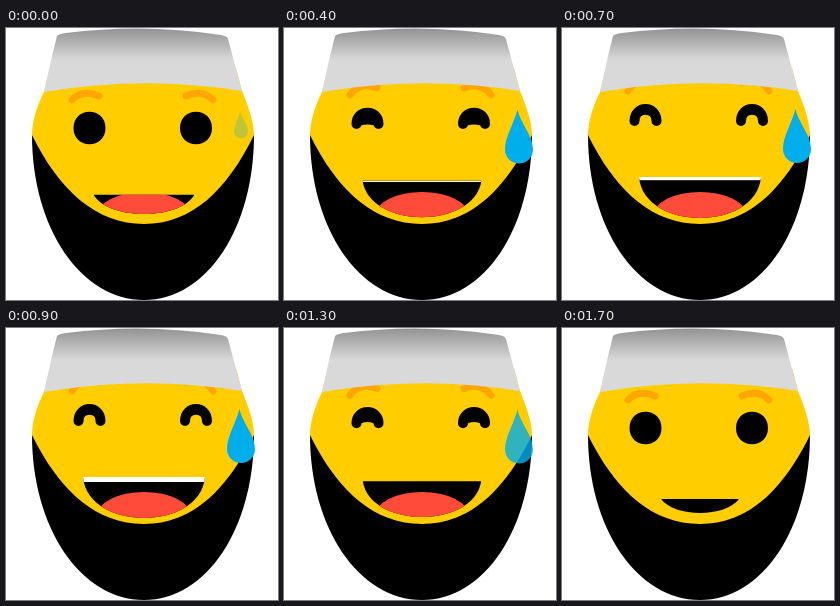
Recreate the animation shown at these times as an HTML page. Size 272 by 272 pixels, loop 2.5 s.

```html
<!DOCTYPE html>
<html lang="en">
<head>
<meta charset="utf-8">
<title>Laughing face</title>
<style>
html, body { margin: 0; height: 100%; overflow: hidden; background: #fff; }
svg { display: block; width: 100%; height: 100%; }
</style>
</head>
<body>
<svg viewBox="0 0 272 272">
  <defs>
    <linearGradient id="felt" x1="0" y1="0" x2="0" y2="1">
      <stop offset="0" stop-color="#939393"/>
      <stop offset=".5" stop-color="#d9d9d9"/>
    </linearGradient>
    <clipPath id="lips"><path id="lipShape"/></clipPath>
  </defs>
  <path fill="#ffcd00" d="M44 40L38 64C30 80 26 95 26 107C53 162 90 197 138 197S221 162 248 107C248 95 243 80 236 63L230 40Z"/>
  <path d="M26 107C26 200 75 272 138 272S248 200 248 107C221 162 186 196 138 196S53 162 26 107Z"/>
  <g fill="none" stroke="#ffa700" stroke-width="7" stroke-linecap="round">
    <path class="brow" transform="translate(83)"/>
    <path class="brow" transform="translate(190) scale(-1 1)"/>
  </g>
  <path fill="url(#felt)" d="M51 8Q53 6 60 5Q138 -5 215 7Q221 8 222 11L236 63Q138 47 38 64L46 28Z"/>
  <g stroke="#000" stroke-width="10" stroke-linejoin="round">
    <path class="eye" transform="translate(83.5)"/>
    <path class="eye" transform="translate(190)"/>
  </g>
  <g clip-path="url(#lips)">
    <rect x="60" y="140" width="160" height="60"/>
    <ellipse id="tongue" cx="138" cy="188" rx="47" ry="24" fill="#ff4b3a"/>
    <rect id="teeth" x="60" width="160" fill="#fff"/>
  </g>
  <path id="drop" fill="#00aeeb" d="M-1.5 0C1 13 14 26 14 40A14 14 0 0 1 -14 40C-14 27 -5 14 -1.5 0Z"/>
</svg>
<script>
const LOOP = 2500, STEP = 100;

const clamp = v => Math.max(0, Math.min(1, v));
// Rises from 0 to 1 between a and b, falls back between c and d.
const swell = (t, a, b, c, d) => clamp(Math.min((t - a) / (b - a), (d - t) / (d - c)));

const set = (selector, attrs) => {
  for (const el of document.querySelectorAll(selector))
    for (const name in attrs) el.setAttribute(name, attrs[name]);
};

function drawMouth(t, laugh) {
  const top = 171 - 22 * laugh;
  const low = top + (185 + 5 * laugh - top) / .75;
  const half = 39 + 22 * laugh ** .4;
  const bend = half * (.65 + .27 * laugh);
  set('#lipShape', {
    d: `M${138 - half} ${top}C${138 - bend} ${low} ${138 + bend} ${low} ${138 + half} ${top}Z`
  });
  set('#teeth', { y: top, height: 5 * swell(t, -100, 900, 1100, 1300) ** 2 });
  set('#tongue', { opacity: laugh > 0 ? 1 : 0 });
}

function drawEyes(t, laugh) {
  const squint = swell(t, 0, 700, 1100, 1700);
  const base = 100 - 7 * squint;
  const upper = base - 15;
  const lower = base + 15 - 31 * squint ** .7;
  set('.eye', { d: `M-11 ${base}C-11 ${upper} 11 ${upper} 11 ${base}C11 ${lower} -11 ${lower} -11 ${base}Z` });

  const lift = laugh ** 3;
  set('.brow', { d: `M-17 ${72 - 9 * lift}Q-7 ${61 - 14 * lift} 10 ${68 - 14 * lift}` });
}

function drawDrop(t, laugh) {
  const size = clamp(.5 + t / 800);
  set('#drop', {
    transform: `translate(235 ${84 - 3 * laugh}) scale(${size})`,
    opacity: t < 1000 ? size ** 2 : laugh
  });
}

function draw(now) {
  const t = Math.floor(now % LOOP / STEP) * STEP;
  const laugh = Math.sin(Math.PI / 2 * swell(t, -100, 700, 1100, 1600));
  drawMouth(t, laugh);
  drawEyes(t, laugh);
  drawDrop(t, laugh);
}

const start = performance.now();
function tick() {
  draw(performance.now() - start);
  requestAnimationFrame(tick);
}
tick();
</script>
</body>
</html>
```
